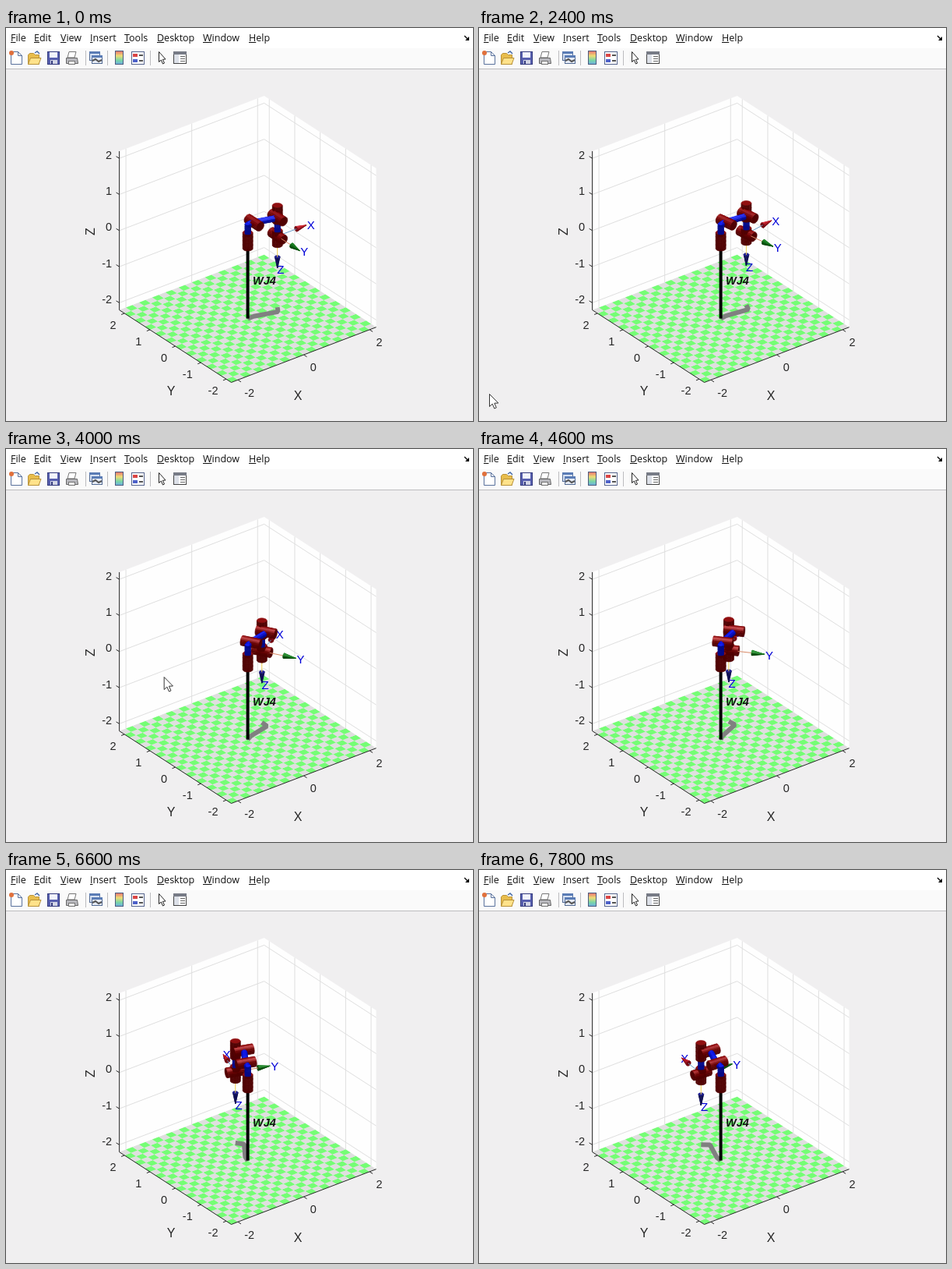
An HTML page with a canvas that plays this animation: 600 by 504 pixels, repeating every 8000 ms.

```html
<!DOCTYPE html>
<html lang="en">
<head>
<meta charset="utf-8">
<title>Robot arm plot</title>
<style>
  html, body { margin: 0; width: 100%; height: 100%; overflow: hidden; background: #f0eff0; }
  canvas { display: block; }
</style>
</head>
<body>
<canvas id="stage" width="600" height="504"></canvas>
<script>
const W = 600, H = 504, LOOP = 8000, STEP = 200;
const stage = document.getElementById('stage').getContext('2d');
const backdrop = document.createElement('canvas');
backdrop.width = W;
backdrop.height = H;
const SANS = '"Liberation Sans", Arial, sans-serif';
const LIM = 2.2;

// Orthographic view, azimuth -37.5, elevation 30
const CAM = [-0.527, -0.687, 0.5];
const HALF = [-0.304, -0.397, 0.866];
const project = ([x, y, z]) => [310.6 + 42.3 * x - 32.7 * y, 270.8 - 16.1 * x - 21.1 * y - 46.3 * z];

const dot = (a, b) => a[0] * b[0] + a[1] * b[1] + a[2] * b[2];
const add = (a, b, k = 1) => a.map((v, i) => v + b[i] * k);
const scale = (a, k) => a.map(v => v * k);
const unit = a => scale(a, 1 / Math.hypot(...a));
const cross = (a, b) => [a[1] * b[2] - a[2] * b[1], a[2] * b[0] - a[0] * b[2], a[0] * b[1] - a[1] * b[0]];
const mix = (a, b, k) => a.map((v, i) => v + (b[i] - v) * k);

function trace(c, points) {
  c.beginPath();
  points.forEach(([x, y], i) => i ? c.lineTo(x, y) : c.moveTo(x, y));
}
function fill(c, points, color, outline, width = 1) {
  trace(c, points);
  c.closePath();
  c.fillStyle = color;
  c.fill();
  if (outline) { c.strokeStyle = outline; c.lineWidth = width; c.stroke(); }
}
function line(c, points, color, width = 1) {
  trace(c, points);
  c.strokeStyle = color;
  c.lineWidth = width;
  c.stroke();
}
function text(c, str, x, y, font, color, align = 'left', baseline = 'middle') {
  c.font = font;
  c.fillStyle = color;
  c.textAlign = align;
  c.textBaseline = baseline;
  c.fillText(str, x, y);
}

function drawMenu(c) {
  c.fillStyle = '#fff';
  c.fillRect(0, 0, W, 26);
  const menus = { File: 6, Edit: 36, View: 70, Insert: 108, Tools: 152, Desktop: 194, Window: 253, Help: 312 };
  for (const [name, x] of Object.entries(menus)) {
    text(c, name, x, 17, '12.5px "Open Sans", "Noto Sans", sans-serif', '#111', 'left', 'alphabetic');
    c.fillRect(x, 18, c.measureText(name[0]).width, 1);
  }
  line(c, [[589, 10], [593, 14]], '#000', 1.2);
  fill(c, [[595, 11], [595, 16], [590, 16]], '#000');
}

function drawToolbar(c) {
  const box = (x, y, w, h, color, edge) => {
    c.fillStyle = color;
    c.fillRect(x, y, w, h);
    if (edge) { c.strokeStyle = edge; c.lineWidth = 1; c.strokeRect(x + .5, y + .5, w - 1, h - 1); }
  };
  box(0, 26, W, 26, '#fafafa');
  box(0, 52, W, 1, '#bdbdbf');
  for (const x of [102, 130, 185]) box(x, 29, 1, 19, '#bcbcbf');
  // new
  fill(c, [[6.5, 30.5], [15.5, 30.5], [20.5, 35.5], [20.5, 46.5], [6.5, 46.5]], '#fff', '#59719c');
  line(c, [[15.5, 30.5], [15.5, 35.5], [20.5, 35.5]], '#59719c');
  c.fillStyle = '#e0703c';
  c.beginPath();
  c.arc(7, 32, 3, 0, 7);
  c.fill();
  // open
  fill(c, [[28.5, 34.5], [30.5, 32.5], [35.5, 32.5], [37.5, 34.5], [42.5, 34.5], [42.5, 46.5], [28.5, 46.5]], '#e8bd4c', '#b8923a');
  fill(c, [[31.5, 38.5], [45, 38.5], [42, 46.5], [28.5, 46.5]], '#ffe28a', '#b8923a');
  line(c, [[37, 32], [40, 30], [43, 33]], '#456aa8', 1.5);
  // save
  box(53, 30, 16, 17, '#575fae', '#333a7d');
  box(56, 31, 10, 7, '#f1f3fc');
  box(57, 41, 9, 5, '#d2d5e5');
  box(58, 42, 2, 4, '#333a7d');
  // print
  fill(c, [[81, 30.5], [90, 30.5], [88, 38], [79, 38]], '#fff', '#777');
  fill(c, [[77.5, 38.5], [91.5, 38.5], [92.5, 45.5], [77.5, 45.5]], '#b9b9be', '#666');
  box(80, 42, 9, 5, '#eee', '#777');
  // link
  box(107, 30, 14, 12, '#d5e0f2', '#536b94');
  box(107, 30, 14, 3, '#5a7cb5');
  box(110, 35, 14, 11, '#e5ebf6', '#536b94');
  box(110, 35, 14, 3, '#5a7cb5');
  line(c, [[111, 42], [115, 40], [119, 43], [123, 41]], '#555', 2);
  // colorbar
  const ramp = c.createLinearGradient(0, 30, 0, 47);
  ['#e97870', '#eedc74', '#79d7a5', '#6da9e8'].forEach((color, i) => ramp.addColorStop(i / 3, color));
  box(140, 29, 11, 18, ramp, '#4b5b7d');
  // legend
  box(161, 30, 17, 17, '#fff', '#55648c');
  box(163, 33, 6, 4, '#d94545');
  box(163, 40, 6, 4, '#4c60c8');
  box(171, 34, 5, 2, '#555');
  box(171, 41, 5, 2, '#555');
  // pointer and property panel
  fill(c, [[196.5, 30.5], [196.5, 43.5], [199.3, 41], [201.5, 46], [203.5, 45], [201.3, 40.3], [205, 40]], '#fff', '#222');
  box(215, 30, 17, 16, '#fff', '#444');
  box(215, 30, 17, 4, '#777b86');
  box(216, 34, 6, 11, '#dce0e8');
  for (const y of [36, 39, 42]) box(224, y, 6, 1, '#666');
}

function drawAxes(c) {
  const path = (color, ...points) => line(c, points.map(project), color);
  fill(c, [[-LIM, LIM, -LIM], [-LIM, LIM, LIM], [LIM, LIM, LIM], [LIM, -LIM, LIM], [LIM, -LIM, -LIM], [LIM, LIM, -LIM]].map(project), '#fefefe');

  const grid = '#dfdfdf';
  for (const v of [-2, 0, 2]) path(grid, [v, LIM, -LIM], [v, LIM, LIM]);
  for (let v = -2; v <= 2; v++) {
    path(grid, [LIM, v, -LIM], [LIM, v, LIM]);
    path(grid, [-LIM, LIM, v], [LIM, LIM, v], [LIM, -LIM, v]);
  }

  const tiles = 22, size = 2 * LIM / tiles;
  for (let i = 0; i < tiles; i++) for (let j = 0; j < tiles; j++) {
    const x = -LIM + i * size, y = -LIM + j * size;
    const corners = [[x, y], [x + size, y], [x + size, y + size], [x, y + size]];
    fill(c, corners.map(([a, b]) => project([a, b, -LIM])), (i + j) % 2 ? '#dfdfdf' : '#75fd75');
  }

  const ink = '#262626', font = '14.5px ' + SANS;
  path(ink, [-LIM, LIM, LIM], [-LIM, LIM, -LIM], [-LIM, -LIM, -LIM], [LIM, -LIM, -LIM]);
  const tick = (point, dx, dy, value, lx, ly, align) => {
    const [x, y] = project(point);
    line(c, [[x, y], [x + dx, y + dy]], ink);
    text(c, value, x + lx, y + ly, font, ink, align);
  };
  for (let v = -2; v <= 2; v++) {
    tick([-LIM, LIM, v], -4, -2.5, v, -9.5, -3.5, 'right');
    tick([-LIM, v, -LIM], -4, 1.6, v, -10.5, 16, 'right');
    if (v % 2 === 0) tick([v, -LIM, -LIM], 4, 2.6, v, 8.3, 17.3, 'left');
  }
  text(c, 'X', 375, 473, '16px ' + SANS, ink, 'center');
  text(c, 'Y', 212, 467, '16px ' + SANS, ink, 'center');
  c.save();
  c.translate(109.5, 261);
  c.rotate(-Math.PI / 2);
  text(c, 'Z', 0, 0, '16px ' + SANS, ink, 'center');
  c.restore();
}

const RED = [124, 3, 4], BLUE = [8, 18, 215];

function shade(rgb, n) {
  const diffuse = 0.65 + 0.42 * Math.max(0, n[2]);
  const gloss = 85 * Math.max(0, dot(n, HALF)) ** 14;
  return `rgb(${rgb.map(v => Math.min(255, Math.round(v * diffuse + gloss))).join()})`;
}

// Adds the visible facets of a cylinder or cone to the list of parts
function tube(parts, a, b, r0, r1, rgb, sides = 20, cuts = 4) {
  const u = unit(add(b, a, -1));
  const v = unit(cross(u, Math.abs(u[2]) > 0.9 ? [1, 0, 0] : [0, 0, 1]));
  const w = cross(u, v);
  const normal = i => {
    const t = i / sides * 2 * Math.PI;
    return add(scale(v, Math.cos(t)), w, Math.sin(t));
  };
  const face = (points, n) => {
    if (dot(n, CAM) <= 0) return;
    const center = scale(points.reduce((s, p) => add(s, p)), 1 / points.length);
    const color = shade(rgb, n), flat = points.map(project);
    parts.push({ depth: dot(center, CAM), draw: c => fill(c, flat, color, color, 0.6) });
  };
  const rim = (i, k) => add(mix(a, b, k), normal(i), r0 + (r1 - r0) * k);
  for (let i = 0; i < sides; i++) for (let j = 0; j < cuts; j++) {
    const k = j / cuts, m = (j + 1) / cuts;
    face([rim(i, k), rim(i + 1, k), rim(i + 1, m), rim(i, m)], normal(i + 0.5));
  }
  const ring = k => Array.from({ length: sides }, (_, i) => rim(i, k));
  if (r0) face(ring(0), scale(u, -1));
  if (r1) face(ring(1), u);
}

function drawRobot(c, angle) {
  const cos = Math.cos(angle), sin = Math.sin(angle);
  // r: reach, l: offset to the right of the arm, z: height
  const at = (r, l, z) => [r * cos + l * sin, r * sin - l * cos, z];
  const parts = [];
  const stroke = (a, b, color, width) => parts.push({
    depth: dot(mix(a, b, 0.5), CAM),
    draw: c => line(c, [project(a), project(b)], color, width)
  });
  const joint = (a, b) => tube(parts, at(...a), at(...b), 0.12, 0.12, RED);
  const link = (a, b) => tube(parts, at(...a), at(...b), 0.07, 0.07, BLUE, 12, 6);

  c.lineJoin = 'bevel';
  line(c, [[0, 0], [0.18, 0], [0.78, 0.18], [0.9, 0]].map(([r, l]) => project(at(r, l, -LIM))), '#808080', 6);
  c.lineJoin = 'miter';

  stroke([0, 0, -LIM], [0, 0, -0.26], '#000', 4);
  link([0, 0, 0.1], [0, 0, 0.42]);
  link([0, 0, 0.4], [0.18, 0, 0.4]);
  link([0.18, 0, 0.4], [0.78, 0.18, 0.4]);
  link([0.78, 0.18, 0.4], [0.9, 0, 0.4]);
  link([0.9, 0, 0.4], [0.9, 0, -0.2]);
  joint([0, 0, -0.26], [0, 0, 0.18]);
  joint([0.18, -0.22, 0.4], [0.18, 0.25, 0.4]);
  joint([0.78, -0.08, 0.4], [0.78, 0.4, 0.4]);
  joint([0.9, 0, 0.16], [0.9, 0, 0.62]);
  joint([0.9, -0.23, -0.22], [0.9, 0.24, -0.22]);
  joint([0.9, 0, -0.48], [0.9, 0, -0.07]);

  const tool = [0.9, 0, -0.23];
  const arrows = [
    ['X', [1, 0, 0], '#6b9cc8', [175, 12, 25]],
    ['Y', [0, 1, 0], '#d98a68', [0, 100, 8]],
    ['Z', [0, 0, -1], '#f0cd50', [18, 18, 125]]
  ];
  for (const [name, dir, color, rgb] of arrows) {
    const along = k => at(...add(tool, dir, k));
    stroke(along(0.15), along(0.58), color, 1);
    tube(parts, along(0.57), along(0.88), 0.065, 0, rgb, 12, 1);
    const anchor = along(0.91), [x, y] = project(anchor);
    parts.push({ depth: dot(anchor, CAM), draw: c => text(c, name, x - 0.3, y + 2, '15px ' + SANS, '#0000d8') });
  }
  parts.sort((p, q) => p.depth - q.depth).forEach(p => p.draw(c));
  text(c, 'WJ4', 317, 325, `italic bold 14.5px ${SANS}`, '#111');
}

// Pointer tracks: time, x, y
const TRACKS = [
  [[200, 461, 66], [800, 140, 470], [1200, 85, 442], [2000, 30, 462], [2400, 13, 469], [2600, 13, 469]],
  [[3800, 13, 434], [4400, 582, 8]]
];
const ARROW = [[0, 0], [0, 16], [3.7, 12.6], [6.3, 18.5], [8.8, 17.4], [6.3, 11.7], [11.3, 11.5]];

function drawPointer(c, t) {
  for (const track of TRACKS) for (let i = 1; i < track.length; i++) {
    const [a, b] = [track[i - 1], track[i]];
    if (t < a[0] || t > b[0]) continue;
    const [, x, y] = mix(a, b, (t - a[0]) / (b[0] - a[0]));
    fill(c, ARROW.map(p => [p[0] + x + .5, p[1] + y + .5]), '#fff', '#333');
    return;
  }
}

// Quintic sweep of the base joint from 0 to 90 degrees
function baseAngle(t) {
  const s = (t + 100) / 10000;
  return Math.PI / 2 * s ** 3 * (10 - 15 * s + 6 * s * s);
}

const back = backdrop.getContext('2d');
back.fillStyle = '#f0eff0';
back.fillRect(0, 0, W, H);
drawMenu(back);
drawToolbar(back);
drawAxes(back);

const start = performance.now();
let shown = -1;
function frame() {
  const t = Math.floor((performance.now() - start) % LOOP / STEP) * STEP;
  if (t !== shown) {
    shown = t;
    stage.drawImage(backdrop, 0, 0);
    drawRobot(stage, baseAngle(t));
    drawPointer(stage, t);
  }
  requestAnimationFrame(frame);
}
frame();
</script>
</body>
</html>
```
